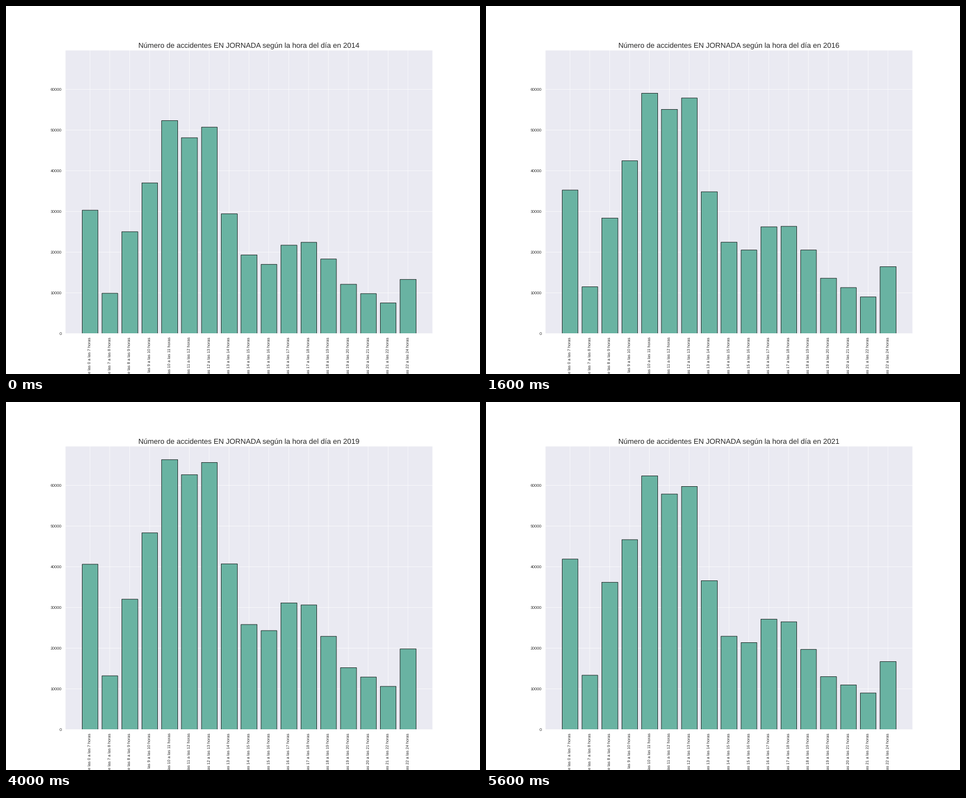
These frames come from a looping animation (849 by 660 pixels, 6.4 s). A matplotlib script:

```python
import numpy as np
import matplotlib.pyplot as plt
from matplotlib.animation import FuncAnimation

W, H, DPI = 849, 660, 48
PT = 47.16 / DPI  # chart sizes are given for an 18 x 14 inch page
INK = "#262626"
X_MIN, X_MAX, Y_MAX = -1.24, 17.24, 69600

plt.rcParams["font.family"] = "Liberation Sans"
plt.rcParams["text.hinting"] = "none"

HOURS = [0, *range(7, 23), 24]
LABELS = [f"De las {a} a las {b} horas" for a, b in zip(HOURS, HOURS[1:])]
YEARS = range(2014, 2022)
SLOT = np.arange(len(LABELS))

# Thousands of accidents per slot in the first year and in the peak year 2019
FIRST = np.array([30.3, 9.9, 25, 37, 52.3, 48.1, 50.7, 29.4, 19.3,
                  17, 21.7, 22.4, 18.3, 12.1, 9.8, 7.5, 13.3])
PEAK = np.array([40.6, 13.2, 32, 48.3, 66.3, 62.6, 65.6, 40.7, 25.8,
                 24.3, 31.1, 30.6, 22.9, 15.2, 12.9, 10.6, 19.8])


def counts(year):
    """Steady growth up to 2019, then a drop that is deeper late in the day."""
    if year <= 2019:
        growth = np.interp(year, [2014, 2016, 2018, 2019], [0, 0.48, 0.8, 1])
        return 1000 * (FIRST + (PEAK - FIRST) * growth)
    early_bump = 0.13 * np.exp(-3 * (SLOT - 2) ** 2)
    kept = 0.705 + 0.18 * np.exp(-SLOT / 7) + early_bump
    return 1000 * PEAK * kept * 1.165 ** (year - 2020)


def snap(x):
    """Move x to the nearest pixel centre of the page at 72 dpi."""
    left, unit = 162, 1004.4 / (X_MAX - X_MIN)
    pixel = np.floor(left + (x - X_MIN) * unit + 0.5) + 0.5
    return X_MIN + (pixel - left) / unit


fig = plt.figure(figsize=(W / DPI, H / DPI), dpi=DPI, facecolor="white")
ax = fig.add_axes([0.125, 0.11, 0.775, 0.77], facecolor="#EAEAF2")
ax.patch.set_snap(False)

starts, ends = snap(SLOT - 0.4), snap(SLOT + 0.4)
bars = ax.bar(starts, counts(2014), width=ends - starts, align="edge",
              color="#69b3a2", edgecolor="black", linewidth=1.15 * PT,
              snap=False)
ax.set_xlim(X_MIN, X_MAX)
ax.set_ylim(0, Y_MAX)
ax.set_xticks(SLOT, LABELS, rotation=90)
ax.set_yticks(range(0, 60001, 10000))
ax.tick_params(length=0, pad=9.5 * PT, labelsize=11 * PT, labelcolor=INK)

ax.set_axisbelow(True)
ax.grid(color="white", linewidth=PT, snap=False)
for spine in ax.spines.values():
    spine.set(edgecolor="white", linewidth=1.25 * PT, snap=False)

title = ax.set_title("", fontsize=20 * PT, color=INK, pad=6 * PT)


def draw(i):
    year = YEARS[i]
    for bar, value in zip(bars, counts(year)):
        bar.set_height(value)
    title.set_text(f"Número de accidentes EN JORNADA según la hora del día en {year}")
    return [*bars, title]


anim = FuncAnimation(fig, draw, frames=len(YEARS), interval=800,
                     repeat=True, repeat_delay=0, blit=False)
plt.show()
```
